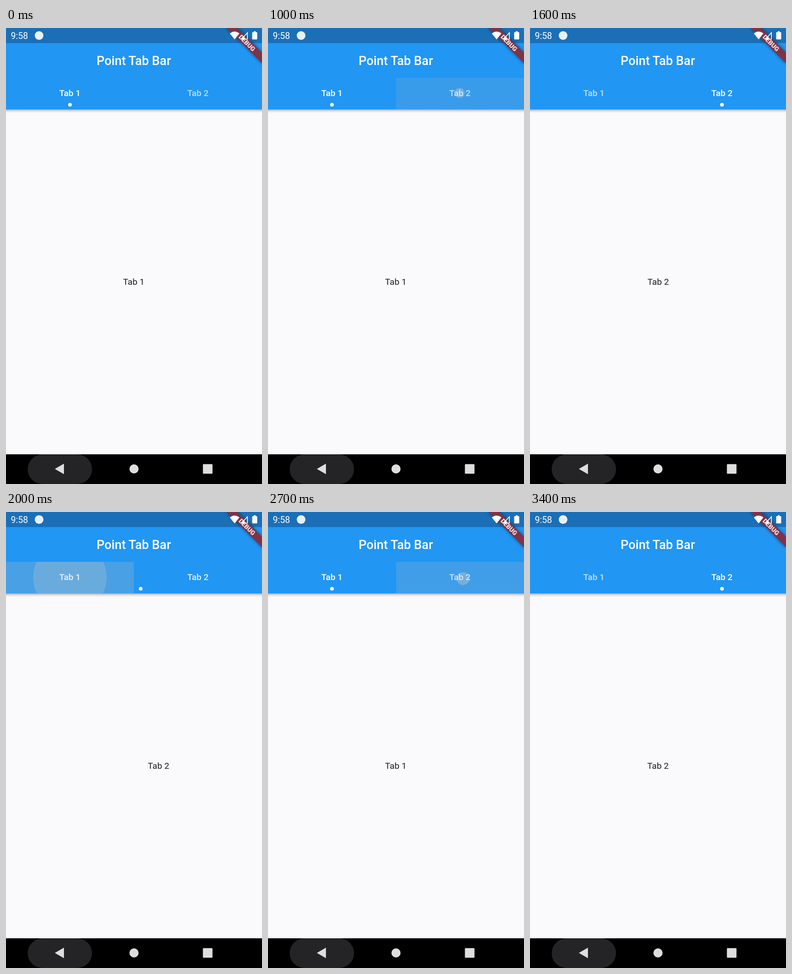
An HTML page that plays this animation: 561 by 998 pixels, repeating every 3.5 s.

```html
<!DOCTYPE html>
<html lang="en">
<head>
<meta charset="utf-8">
<title>Point Tab Bar</title>
<style>
  html, body { margin: 0; width: 100%; height: 100%; overflow: hidden; background: #faf9fc; }
  svg { display: block; width: 100vw; height: 100vh; font-family: Roboto, sans-serif; }
  .mid { text-anchor: middle; }
  .label { font-size: 19.1px; font-weight: 500; fill: #fff; }
  .body { font-size: 19.1px; fill: #1d1d1f; }
</style>
</head>
<body>
<svg viewBox="0 0 561 998">
  <defs>
    <linearGradient id="shade" x2="0" y2="1">
      <stop offset="0" stop-color="#000" stop-opacity=".34"/>
      <stop offset=".4" stop-color="#000" stop-opacity=".12"/>
      <stop offset="1" stop-color="#000" stop-opacity="0"/>
    </linearGradient>
    <filter id="blur" x="-20%" y="-80%" width="140%" height="260%">
      <feGaussianBlur stdDeviation="3.5"/>
    </filter>
    <clipPath id="tabClip0"><rect y="109" width="280.5" height="69"/></clipPath>
    <clipPath id="tabClip1"><rect x="280.5" y="109" width="280.5" height="69"/></clipPath>
  </defs>

  <rect width="561" height="998" fill="#faf9fc"/>
  <g id="pages">
    <text class="body mid" x="280" y="562">Tab 1</text>
    <text class="body mid" x="841.5" y="562">Tab 2</text>
  </g>

  <rect y="178" width="561" height="8" fill="url(#shade)"/>
  <rect width="561" height="178" fill="#2196f3"/>
  <rect width="561" height="33" fill="#1b6fb7"/>
  <text class="mid" x="280" y="81" font-size="27.3" font-weight="500" fill="#fff">Point Tab Bar</text>

  <g id="ink"></g>
  <text class="label mid" x="140" y="149">Tab 1</text>
  <text class="label mid" x="420.5" y="149">Tab 2</text>
  <circle id="dot" cy="168" r="4.1" fill="#fff"/>

  <g transform="translate(561 0) rotate(45)">
    <rect x="-55" y="38.2" width="110" height="16.4" opacity=".5" filter="url(#blur)"/>
    <rect x="-55" y="38.2" width="110" height="16.4" fill="#7d3448"/>
    <text class="mid" y="51.3" font-size="13.9" font-weight="900" fill="#f3e4e8">DEBUG</text>
  </g>

  <g fill="#fff">
    <text x="10.5" y="24" font-size="19.6">9:58</text>
    <circle cx="72.5" cy="16.5" r="9.5" fill="#e8f1f9"/>
    <path d="M490.500 12Q501 3.500 511.500 12L501 25Z"/>
    <path d="M529 10.500V24.500H516Z" fill="none" stroke="#fff" stroke-width="1.7"/>
    <path d="M514.500 25.300L522.500 16.500V25.300Z"/>
    <path d="M543 7h4v2h2a1.500 1.500 0 0 1 1.500 1.500v13a1.500 1.500 0 0 1-1.500 1.500h-8a1.500 1.500 0 0 1-1.500-1.500v-13a1.500 1.500 0 0 1 1.500-1.500h2z"/>
  </g>

  <rect y="933" width="561" height="65"/>
  <rect x="47.500" y="933" width="141" height="65" rx="33" fill="#242426"/>
  <g fill="#dedede">
    <path d="M107 965L127 953.500V976.500Z"/>
    <circle cx="280.500" cy="965" r="10"/>
    <rect x="431.500" y="954.500" width="21" height="21" rx="1.500"/>
  </g>
</svg>
<script>
const LOOP = 3500, WIDTH = 561, TAB_WIDTH = WIDTH / 2;
const SPLASH_RADIUS = 144;
// Each tap: touch point, press and release times, and when the page finishes sliding.
const taps = [
  { tab: 1, x: 420, y: 142, press: 925, release: 1220, settled: 1615 },
  { tab: 0, x: 140, y: 143, press: 1800, release: 1930, settled: 2278 },
  { tab: 1, x: 428, y: 146, press: 2603, release: 2830, settled: 3180 }
];

const clamp = v => Math.min(1, Math.max(0, v));
const mix = (a, b, k) => a + (b - a) * k;
const bezier = (u, a, b) => 3 * (1 - u) ** 2 * u * a + 3 * (1 - u) * u * u * b + u ** 3;

// Equivalent of the CSS "ease" curve.
function ease(x) {
  if (x <= 0 || x >= 1) return clamp(x);
  let low = 0, high = 1;
  for (let i = 0; i < 24; i++) {
    const mid = (low + high) / 2;
    if (bezier(mid, 0.25, 0.25) < x) low = mid; else high = mid;
  }
  return bezier(low, 0.1, 1);
}

function add(parent, name, attrs) {
  const node = document.createElementNS("http://www.w3.org/2000/svg", name);
  set(node, attrs);
  return parent.appendChild(node);
}

function set(node, attrs) {
  for (const key in attrs) node.setAttribute(key, attrs[key]);
}

const pages = document.getElementById("pages");
const dot = document.getElementById("dot");
const labels = document.querySelectorAll(".label");

for (const tap of taps) {
  const group = add(document.getElementById("ink"), "g", { "clip-path": `url(#tabClip${tap.tab})` });
  tap.highlight = add(group, "rect", {
    x: tap.tab * TAB_WIDTH, y: 109, width: TAB_WIDTH, height: 69, fill: "#bcbcbc"
  });
  tap.splash = add(group, "circle", { fill: "#c8c8c8" });
}

function drawInk(tap, t) {
  const fade = 1 - clamp((t - tap.release) / 200);
  const held = clamp((Math.min(t, tap.release) - tap.press) / 1000);
  const grown = mix(held, 1, clamp((t - tap.release) / 144));
  set(tap.highlight, { opacity: 0.4 * clamp((t - tap.press) / 200) * fade });
  set(tap.splash, {
    cx: mix(tap.x, (tap.tab + 0.5) * TAB_WIDTH, grown),
    cy: mix(tap.y, 143.5, grown),
    r: SPLASH_RADIUS * grown,
    opacity: t < tap.press ? 0 : 0.4 * fade
  });
}

function draw(t) {
  let page = 0, marker = 0;
  for (const tap of taps) {
    const pageStart = tap.release + 40;
    page = mix(page, tap.tab, ease((t - pageStart) / (tap.settled - pageStart)));
    marker = mix(marker, tap.tab, ease((t - tap.release) / 265));
    drawInk(tap, t);
  }
  set(pages, { transform: `translate(${-page * WIDTH} 0)` });
  set(dot, { cx: 140.2 + marker * TAB_WIDTH });
  set(labels[0], { "fill-opacity": mix(1, 0.7, marker) });
  set(labels[1], { "fill-opacity": mix(0.7, 1, marker) });
}

const start = performance.now();
function tick() {
  draw((performance.now() - start) % LOOP);
  requestAnimationFrame(tick);
}
tick();
</script>
</body>
</html>
```
